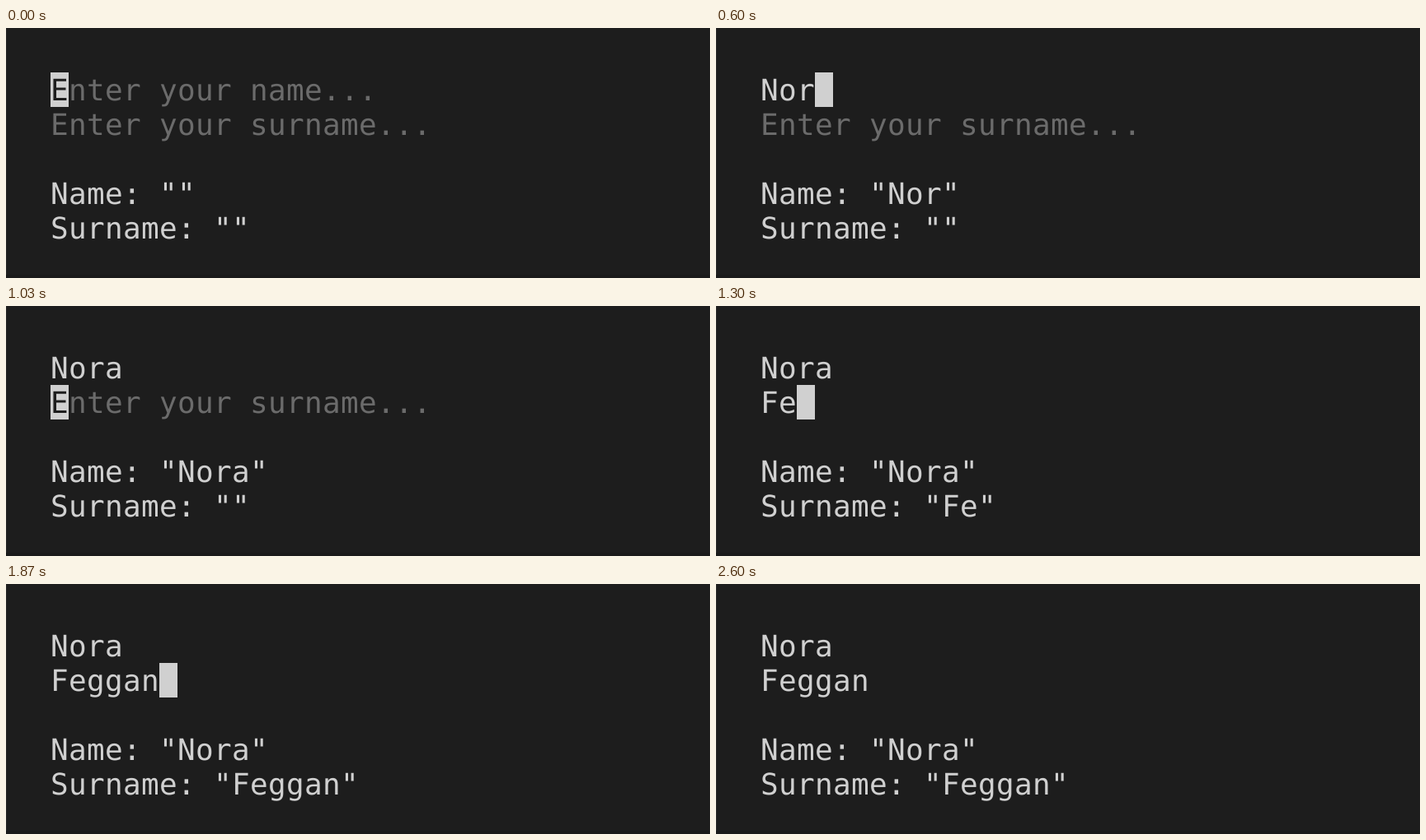
Animation of 854 by 304 pixels, one loop 3300 ms. Source, as an HTML page:

```html
<!DOCTYPE html>
<html lang="en">
<head>
<meta charset="utf-8">
<title>Name form</title>
<style>
  html, body { margin: 0; width: 100%; height: 100%; overflow: hidden; background: #1d1d1d; }
  svg { display: block; width: 854px; height: 304px; }
  text {
    font: 36px "DejaVu Sans Mono", monospace;
    letter-spacing: 0.326px;
    text-rendering: geometricPrecision;
    white-space: pre;
    fill: #d0d0d0;
  }
  .hint { fill: #6b6b6b; }
  .under { fill: #1d1d1d; }
</style>
</head>
<body>
<svg viewBox="0 0 854 304">
  <rect width="854" height="304" fill="#1d1d1d"/>
  <rect width="1" height="304" fill="#292929"/>
  <rect y="300" width="854" height="4" fill="#1a1a1a"/>
  <text id="first" x="54" y="88"></text>
  <text id="last" x="54" y="130"></text>
  <text id="firstOut" x="54" y="214"></text>
  <text id="lastOut" x="54" y="256"></text>
  <rect id="cursor" width="22" height="42" fill="#d0d0d0"/>
  <text id="under" class="under" x="54"></text>
</svg>
<script>
const LOOP = 3300, LEFT = 54, TOP = 54, CELL = 22, LINE = 42, BASELINE = 34;
const FOCUS_NEXT = 1000, BLUR = 2230, ECHO_LAG = 34;
const $ = id => document.getElementById(id);

// Letters of a burst follow each other every `gap` ms; nothing shows before `start`.
const fields = [
  { id: "first", label: "Name", hint: "Enter your name...",
    start: 430, gap: 117, bursts: [{ at: 313, keys: "Nora" }] },
  { id: "last", label: "Surname", hint: "Enter your surname...",
    start: 1300, gap: 84,
    bursts: [{ at: 1180, keys: "Fe" }, { at: 1480, keys: "gga" }, { at: 1836, keys: "n" }] }
];

function typedBy(field, t) {
  return field.bursts.map(({ at, keys }) =>
    keys.slice(0, Math.max(0, Math.floor((t - at) / field.gap) + 1))).join("");
}

function setText(id, text) {
  const el = $(id);
  if (el.textContent !== text) el.textContent = text;
}

function placeCursor(row, col) {
  const y = TOP + row * LINE;
  $("cursor").setAttribute("x", LEFT + col * CELL);
  $("cursor").setAttribute("y", y);
  $("under").setAttribute("y", y + BASELINE);
}

function render(t) {
  const active = t < FOCUS_NEXT ? 0 : t < BLUR ? 1 : -1;
  let covered = "";

  fields.forEach((field, row) => {
    const begun = t >= field.start;
    const typed = begun ? typedBy(field, t) : "";
    const echoed = begun ? typedBy(field, t - ECHO_LAG) : "";

    $(field.id).setAttribute("class", typed ? "" : "hint");
    setText(field.id, typed || field.hint);
    setText(field.id + "Out", `${field.label}: "${echoed}"`);

    if (row === active) {
      placeCursor(row, typed.length);
      if (!typed) covered = field.hint[0];
    }
  });
  $("cursor").style.display = active < 0 ? "none" : "";
  setText("under", covered);
}

const start = performance.now();
function tick() {
  render((performance.now() - start) % LOOP);
  requestAnimationFrame(tick);
}
tick();
</script>
</body>
</html>
```
